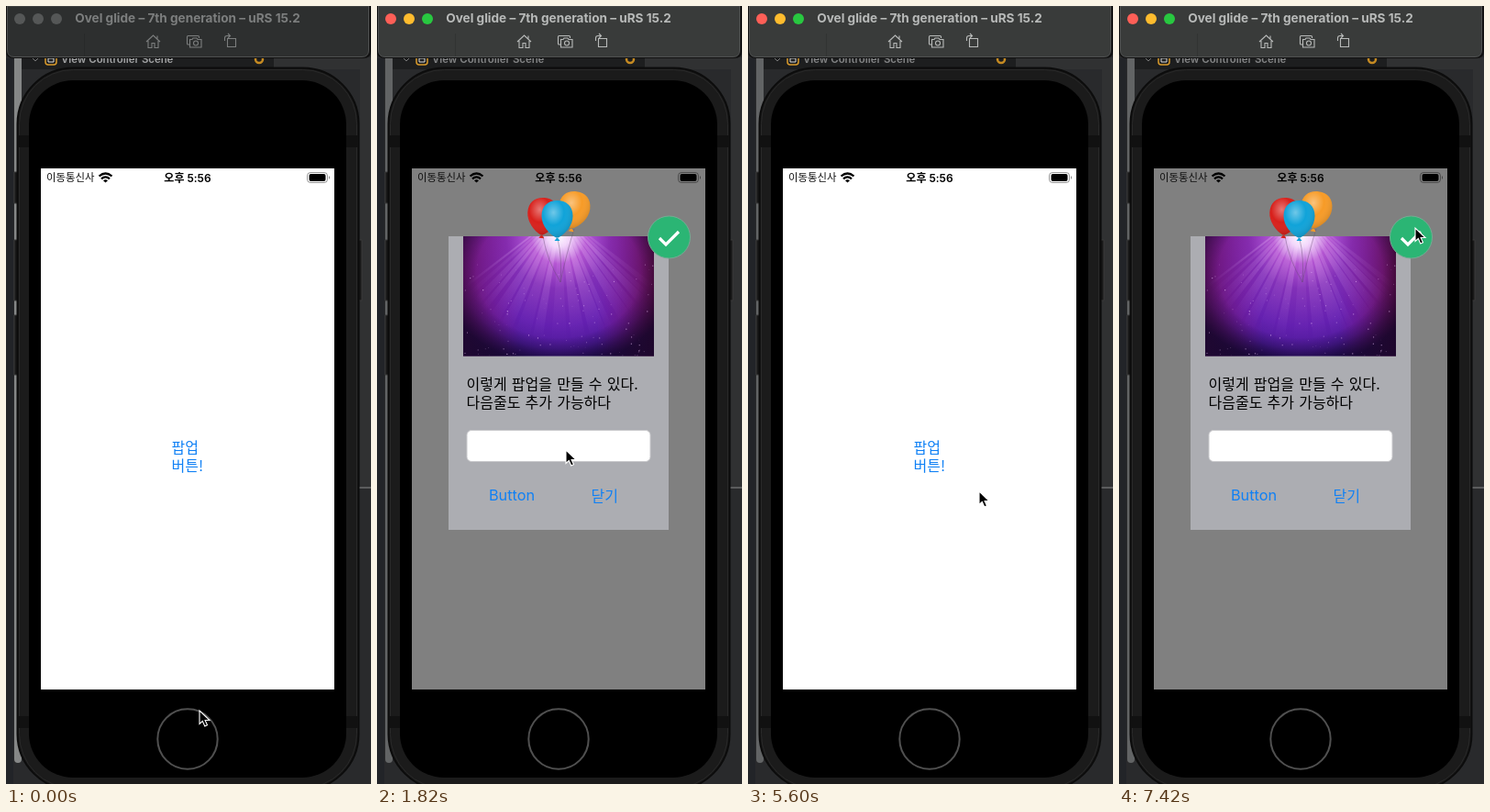
These frames come from a looping animation (398 by 848 pixels, 8 s). An HTML page:

```html
<!DOCTYPE html>
<html lang="ko">
<head>
<meta charset="utf-8">
<style>
  html, body { margin: 0; width: 100%; height: 100%; overflow: hidden; background: #292a2c; }
  svg { display: block; --bar: #2d2f2f; --title: #7c7e7e; --icon: #7c7e7e; --scroll: #858787; --label: #a2a3a4; --red: #555757; --yellow: #555757; --green: #555757; }
  svg.active { --bar: #393b3a; --title: #b8bab9; --icon: #b8bab9; --scroll: #626465; --label: #838485; --red: #fe5f57; --yellow: #febc2e; --green: #28c840; }
  text { font-family: Inter, "Noto Sans CJK KR", "Noto Sans CJK", sans-serif; }
  .ko { font-family: "Noto Sans CJK KR", "Noto Sans CJK", sans-serif; font-size: 16px; word-spacing: .7px; }
  .link { fill: #0f80f5; }
  .line { fill: none; stroke: var(--icon); stroke-width: 1.1; }
</style>
</head>
<body>
<svg id="stage" width="398" height="848" viewBox="0 0 398 848">
  <defs>
    <radialGradient id="glow" gradientUnits="userSpaceOnUse" cx="198" cy="251" r="150">
      <stop offset="0" stop-color="#fff"/>
      <stop offset=".08" stop-color="#f0d6fa"/>
      <stop offset=".2" stop-color="#b456d2"/>
      <stop offset=".38" stop-color="#8230b8"/>
      <stop offset=".65" stop-color="#6420b0"/>
      <stop offset=".82" stop-color="#4f1a9a"/>
      <stop offset="1" stop-color="#1d0a40"/>
    </radialGradient>
    <linearGradient id="sides">
      <stop offset="0" stop-color="#6d104f" stop-opacity=".7"/>
      <stop offset=".3" stop-color="#a01a8c" stop-opacity="0"/>
      <stop offset=".7" stop-color="#a01a8c" stop-opacity="0"/>
      <stop offset="1" stop-color="#5d0c36" stop-opacity=".85"/>
    </linearGradient>
    <radialGradient id="shade" gradientUnits="userSpaceOnUse" cx="198" cy="290" r="128" gradientTransform="translate(0 58) scale(1 .8)">
      <stop offset=".7" stop-color="#0c0528" stop-opacity="0"/>
      <stop offset="1" stop-color="#0c0528" stop-opacity=".75"/>
    </radialGradient>
    <radialGradient id="beam" gradientUnits="userSpaceOnUse" cx="198" cy="251" r="115">
      <stop offset=".1" stop-color="#ffd9ff"/>
      <stop offset="1" stop-color="#d9a0ff" stop-opacity="0"/>
    </radialGradient>
    <radialGradient id="shine" cx=".38" cy=".32" r=".68">
      <stop offset="0" stop-color="#fff" stop-opacity=".4"/>
      <stop offset=".5" stop-color="#fff" stop-opacity="0"/>
      <stop offset="1" stop-color="#000" stop-opacity=".14"/>
    </radialGradient>
    <clipPath id="picture"><path d="M94 251h208v130.500H94z"/></clipPath>
  </defs>

  <!-- Editor behind the simulator -->
  <path d="M0 0h398v848H0z" fill="#292a2c"/>
  <path d="M0 57h8v791H0z" fill="#222428"/>
  <path d="M292 56h106v13H292zM386 57h12v467h-12z" fill="#303132"/>
  <path d="M17 56h275v13H17z" fill="#1d1e1f"/>
  <path d="M384 525h14" stroke="#5b5c5d" stroke-width="2"/>
  <rect x="9" y="40" width="8" height="785" rx="4" fill="var(--scroll)"/>
  <path d="M28 56l4 4 4-4" fill="none" stroke="#777"/>
  <rect x="43" y="52" width="12" height="12" rx="3" fill="none" stroke="#d99a2b" stroke-width="1.5"/>
  <path d="M46 57h6v4h-6z" fill="none" stroke="#ddd"/>
  <text x="60" y="62.300" font-size="11.400" font-weight="600" fill="var(--label)">View Controller Scene</text>
  <circle cx="276" cy="58" r="4" fill="none" stroke="#c58a22" stroke-width="2.5"/>

  <!-- Device -->
  <g fill="#191919" stroke="#3a3a3a">
    <path d="M12 181h-3v34h3M12 255h-3v66h3M12 337h-3v65h3M385 255h3v66h-3"/>
    <rect x="12.5" y="67.5" width="372" height="787" rx="61" stroke="#0c0c0c" stroke-width="2"/>
    <rect x="14.5" y="69.5" width="368" height="783" rx="59" fill="#1b1b1b" stroke="#292929"/>
  </g>
  <path d="M13 141h12v13H13zM371 141h12v13h-12zM13 774h12v13H13zM371 774h12v13h-12z" fill="#111"/>
  <rect x="25" y="81" width="346" height="760" rx="48"/>
  <circle cx="198" cy="799" r="32.7" fill="none" stroke="#505050" stroke-width="2"/>

  <!-- App screen -->
  <path d="M38 177h320v568H38z" fill="#fff"/>
  <g id="open" class="link">
    <text class="ko" x="180.5" y="487">팝업</text>
    <text class="ko" x="180.5" y="507">버튼!</text>
  </g>
  <path id="dim" d="M38 177h320v568H38z" fill="#808080"/>
  <text class="ko" x="44" y="191.300" style="font-size:11.400px" fill="#111">이동통신사</text>
  <g fill="none" stroke="#000" stroke-width="2.3">
    <path d="M101.5 185.500q7-6 14 0M104 188.400q4.500-4 9 0"/>
    <path d="M106 190.300q2.500-2 5 0l-2.500 2.300z" fill="#000" stroke="none"/>
  </g>
  <text x="198" y="191.600" font-size="12" font-weight="600" text-anchor="middle">오후 5:56</text>
  <rect x="328.500" y="181.500" width="22" height="11" rx="3.500" fill="none" stroke="#000" stroke-opacity=".4"/>
  <rect x="330.500" y="183" width="18" height="8" rx="2"/>
  <path d="M352 185q2 2 0 4z" opacity=".5"/>

  <!-- Popup -->
  <g id="popup">
    <path d="M78 251h240v320H78z" fill="#acadb2"/>
    <g clip-path="url(#picture)">
      <path d="M94 251h208v131H94z" fill="url(#glow)"/>
      <path d="M94 251h208v131H94z" fill="url(#sides)"/>
      <g id="rays" fill="url(#beam)"></g>
      <path d="M94 251h208v131H94z" fill="url(#shade)"/>
      <g id="specks" fill="#f3c9ff"></g>
    </g>
    <path d="M181 251q4 25 19 50M215 243q-8 25-15 58M197 254q5 20 3 47" fill="none" stroke="#664c72" stroke-width=".7" opacity=".6"/>
    <g id="balloons"></g>
    <circle cx="318.500" cy="252" r="23" fill="#2bb574" stroke="#74ac93"/>
    <path d="M308 253l7 7 14-14" fill="none" stroke="#fff" stroke-width="3.200"/>
    <text class="ko" x="97.500" y="418">이렇게 팝업을 만들 수 있다.</text>
    <text class="ko" x="97.500" y="438">다음줄도 추가 가능하다</text>
    <rect x="98" y="462.500" width="200" height="34" rx="5" fill="#fff" stroke="#c8c8cb"/>
    <text class="link" x="147" y="539.300" font-size="16.300" text-anchor="middle">Button</text>
    <text id="close" class="ko link" x="233.500" y="539.500">닫기</text>
  </g>

  <!-- Simulator title bar -->
  <path d="M0 0h398v49q0 8-8 8H8q-8 0-8-8z" fill="#111"/>
  <path d="M1.500 0v48q0 7.500 7.500 7.500h379q7.500 0 7.500-7.500V0z" fill="var(--bar)" stroke="#505252"/>
  <circle cx="15" cy="14" r="6" fill="var(--red)"/>
  <circle cx="35" cy="14" r="6" fill="var(--yellow)"/>
  <circle cx="55" cy="14" r="6" fill="var(--green)"/>
  <path d="M85.500 30v25" stroke="#000" opacity=".12"/>
  <text x="198" y="18.300" font-size="13.600" font-weight="700" text-anchor="middle" fill="var(--title)">Ovel glide – 7th generation – uRS 15.2</text>
  <g class="line">
    <path d="M153 39l7.500-7 7.500 7M155 38v7.500h4v-5h3v5h4V38M165 32.500v3"/>
    <path d="M200 42h-1.500q-1 0-1-1v-7.500q0-1 1-1h11q1 0 1 1V35"/>
    <path d="M200.500 36.500h2.500l1-1.500h4l1 1.500h4v8.500h-12.500z"/>
    <circle cx="207" cy="40.500" r="2.500"/>
    <path d="M241.500 35.500h9v9h-9zM238.500 38v-3q0-2.500 2.500-2.500h3M242 30l2.500 2.500-2.500 2.500"/>
  </g>

  <path id="cursor" d="M0 0v14.500l3.300-3 2.500 5.500 2.700-1.200-2.400-5.300h4.900z" stroke="#fff" stroke-width="1.100"/>
</svg>
<script>
const $ = id => document.getElementById(id);
const LOOP = 8000, TICK = 70;

// Pointer stops: time, x, y
const stops = [
  [0, 211, 768], [490, 206, 484], [2310, 206, 484], [2450, 202, 498],
  [2940, 202, 498], [3080, 204, 495], [3150, 204, 495], [3290, 241, 523],
  [3360, 241, 523], [3430, 242, 511], [3500, 252, 516], [3640, 242, 522],
  [3780, 242, 522], [3920, 252, 529], [6090, 252, 529], [6370, 194, 487],
  [6650, 194, 487], [7000, 300, 190], [7070, 328, 168], [7280, 329, 241],
  [7350, 329, 241], [7420, 323, 242], [LOOP, 323, 242]
];

let seed = 7;
const random = () => (seed = seed * 16807 % 2147483647) / 2147483647;

function decorate() {
  let rays = '', specks = '';
  for (let i = 0; i < 17; i++) {
    const top = 166 + i * 4, bottom = 10 + i * 22.5, width = 6 + random() * 16;
    rays += `<path d="M${top} 251h3L${bottom + width} 370h${-width}z" opacity="${.1 + random() * .25}"/>`;
  }
  for (let i = 0; i < 110; i++) {
    const y = 381 - random() ** 1.5 * 100;
    specks += `<circle cx="${94 + random() * 208}" cy="${y}" r="${.3 + random() * .4}" opacity="${.2 + random() * .5}"/>`;
  }
  $('rays').innerHTML = rays;
  $('specks').innerHTML = specks;
  $('balloons').innerHTML = [[181, 229, '#d8201b', 4], [215, 222, '#f79b27', 8], [196.500, 232, '#10a3d9', 0]]
    .map(([x, y, color, tilt]) => {
      const shape = 'M0 21C-9 17-17 7-17-3C-17-14-10-20 0-20S17-14 17-3C17 7 9 17 0 21z';
      return `<g transform="translate(${x} ${y}) rotate(${tilt})"><path d="${shape}M0 20l-3 4h6z" fill="${color}"/><path d="${shape}" fill="url(#shine)"/></g>`;
    }).join('');
}

function pointerAt(t) {
  const i = stops.findIndex(s => s[0] > t);
  const [t0, x0, y0] = stops[i - 1], [t1, x1, y1] = stops[i];
  const p = (t - t0) / (t1 - t0), e = p * p * (3 - 2 * p);
  return [x0 + (x1 - x0) * e, y0 + (y1 - y0) * e];
}

function draw() {
  const now = performance.now() % LOOP;
  const t = Math.floor(now / TICK) * TICK;
  const during = (from, to) => t >= from && t < to;
  const shown = during(1820, 5600) || t >= 6650;
  $('stage').setAttribute('class', t >= 1400 ? 'active' : '');
  $('popup').style.display = $('dim').style.display = shown ? '' : 'none';
  $('open').style.opacity = during(1400, 1470) ? .45 : during(1470, 1820) || during(6510, 6650) ? .7 : 1;
  $('close').style.opacity = during(5390, 5600) ? .65 : 1;
  $('cursor').setAttribute('transform', `translate(${pointerAt(t)})`);
  requestAnimationFrame(draw);
}

decorate();
draw();
</script>
</body>
</html>
```
